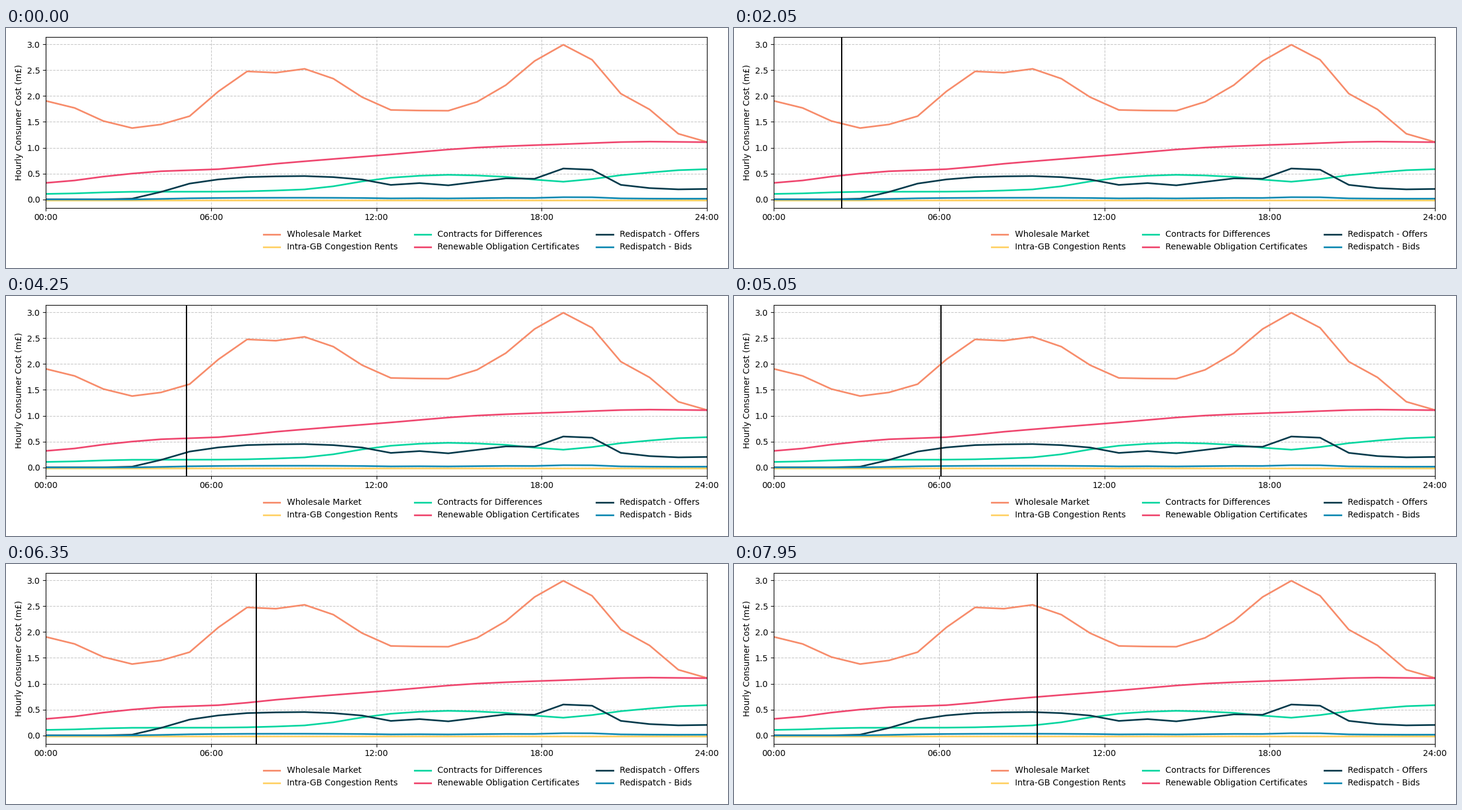
A matplotlib script that plays this animation: 1200x400 px, repeating every 8 s.

```python
import numpy as np
import matplotlib.pyplot as plt
from matplotlib.animation import FuncAnimation

FRAMES, INTERVAL = 160, 50
DAY_STEPS = 400  # cursor positions across a whole day
SAMPLES = np.arange(24)

plt.rcParams["font.family"] = "DejaVu Sans"
plt.rcParams["font.size"] = 10


def smooth(keys):
    """Hourly samples of a cubic through the keys, flat at peaks, dips and ends."""
    x, y = np.array(list(keys)), np.array(list(keys.values()))
    step = np.diff(x)
    rise = np.diff(y) / step
    slope = np.zeros(len(x))
    for k, (a, b) in enumerate(zip(rise, rise[1:]), 1):
        if a * b > 0:
            slope[k] = 2 * a * b / (a + b)
    k = np.clip(np.searchsorted(x, SAMPLES, side="right") - 1, 0, len(x) - 2)
    h = step[k]
    t = (SAMPLES - x[k]) / h
    ease = t * t * (3 - 2 * t)
    return (y[k] + (y[k + 1] - y[k]) * ease
            + h * t * (1 - t) * (slope[k] * (1 - t) - slope[k + 1] * t))


wholesale = smooth({0: 1.905, 3: 1.38, 5: 1.61, 7: 2.475, 8: 2.45, 9: 2.525,
                    10: 2.335, 12: 1.73, 14: 1.715, 16: 2.21, 18: 2.99,
                    19: 2.70, 20: 2.045, 21: 1.74, 22: 1.27, 23: 1.11})
differences = smooth({0: 0.107, 3: 0.148, 6: 0.151, 9: 0.194, 12: 0.42,
                      14: 0.476, 16: 0.437, 18: 0.343, 20: 0.469, 23: 0.585})
renewables = smooth({0: 0.32, 2: 0.442, 4: 0.545, 6: 0.585, 8: 0.69, 12: 0.87,
                     15: 1.003, 18: 1.068, 21: 1.118, 23: 1.107})
offers = smooth({0: 0.002, 2: 0.002, 3: 0.015, 5: 0.307, 7: 0.432, 9: 0.452,
                 11: 0.385, 12: 0.281, 13: 0.316, 14: 0.273, 16: 0.407,
                 17: 0.40, 18: 0.598, 19: 0.575, 20: 0.282, 22: 0.195,
                 23: 0.203})

SERIES = [
    ("Wholesale Market", "#f78c6b", wholesale),
    ("Intra-GB Congestion Rents", "#ffd166", np.full(24, -0.01)),
    ("Contracts for Differences", "#06d6a0", differences),
    ("Renewable Obligation Certificates", "#ef476f", renewables),
    ("Redispatch - Offers", "#073b4c", offers),
    ("Redispatch - Bids", "#118ab2", 0.073 * offers),
]

fig, ax = plt.subplots(figsize=(12, 4), dpi=100, facecolor="white")

hours = np.linspace(0, 24, len(SAMPLES))
for label, color, values in SERIES:
    ax.plot(hours, values, color=color, lw=2, label=label)

ax.set_xlim(0, 24)
ticks = range(0, 25, 6)
ax.set_xticks(ticks, [f"{h:02d}:00" for h in ticks])
ax.set_ylabel("Hourly Consumer Cost (m£)")
ax.grid(linestyle="--", alpha=0.7)
ax.legend(loc="lower right", bbox_to_anchor=(1, -0.3), ncol=3, frameon=False)
fig.tight_layout()

cursor = ax.axvline(0, color="black", lw=1.5)


def update(i):
    hour = 24 * i / (DAY_STEPS - 1)
    cursor.set_xdata([hour, hour])
    return (cursor,)


anim = FuncAnimation(fig, update, frames=FRAMES, interval=INTERVAL,
                     repeat=True, repeat_delay=0)
plt.show()
```
